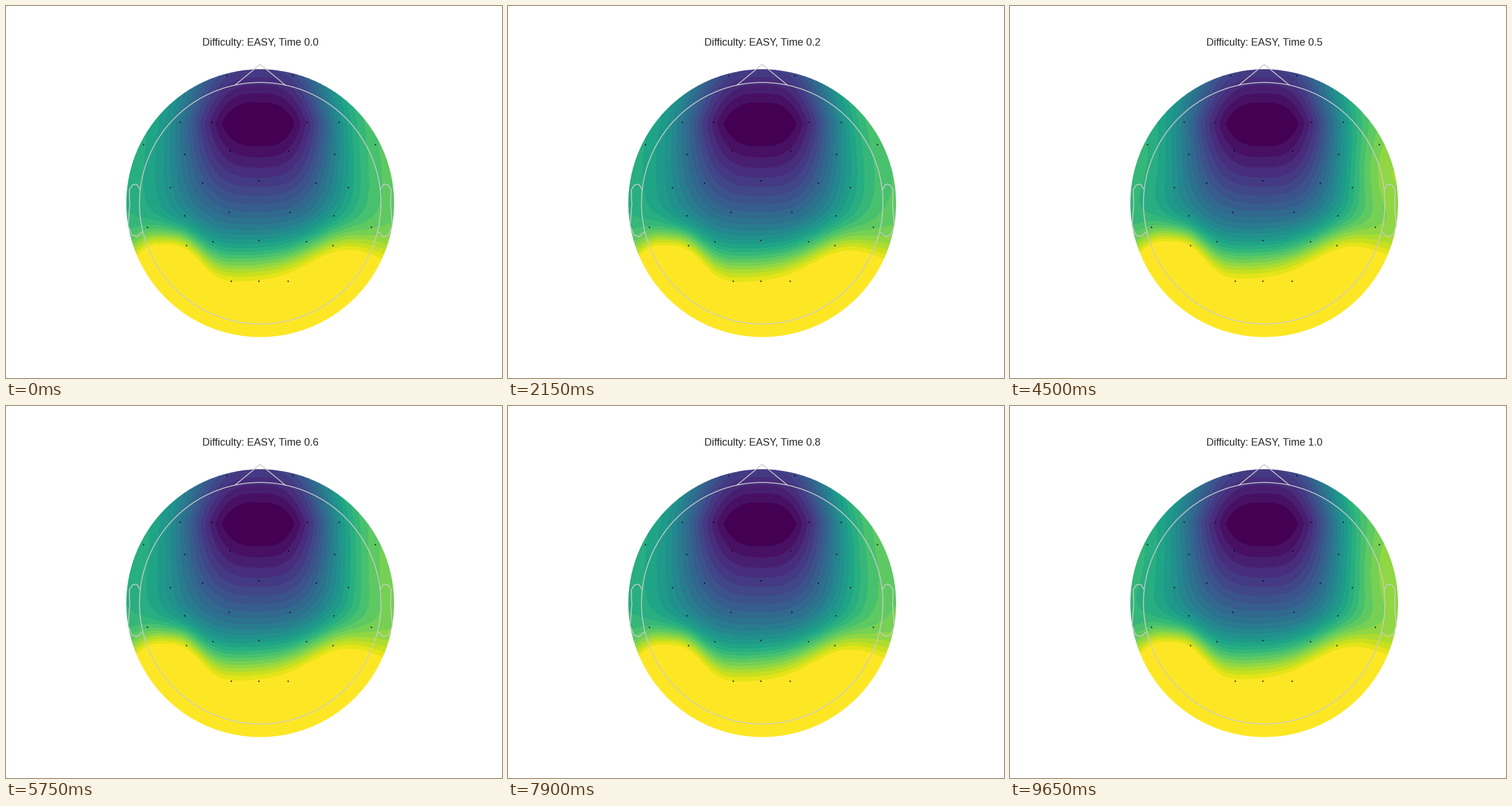
Recreate the animation shown at these times as a matplotlib script. Size 864 by 648 pixels, loop 10000 ms.

```python
import numpy as np
import matplotlib.pyplot as plt
from matplotlib.animation import FuncAnimation
from matplotlib.patches import Circle

W, H, DPI = 864, 648, 108
STEP, LOOP = 50, 10000
CX, CY, HEAD, RIM = 442.8, 343.5, 210.3, 233.2
MID, CORE_Y = 441, 205
BANDS = 25

# Sensors: offset from the midline and height, mirrored to both sides
PAIRS = [(57.5, 120.5), (138.5, 201.5), (83, 202), (202, 241), (130.5, 257.5),
         (51, 252), (155, 316), (99, 308), (130, 365), (53, 359), (195, 384.5),
         (81.5, 410), (127.5, 417), (49.5, 478.5)]
MIDLINE = [304, 408, 479]

# Bursts of change with short rests between: first ms, last ms, steps
RUNS = [(400, 1250, 11), (1450, 2400, 11), (2500, 3500, 11),
        (3650, 4650, 12), (4750, 5750, 9), (5800, 6700, 10),
        (6850, 7700, 10), (7900, 8850, 12), (8950, 9650, 9)]
CHANGES = np.concatenate(
    [np.round(np.linspace(a, b, n) / STEP) * STEP for a, b, n in RUNS])


def hill(x, center, width, power=2):
    return np.exp(-np.abs((x - center) / width) ** power)


def activity(x, y, p):
    """Level at (x, y) for progress p: dark in front, bright at the back."""
    wave = .03 - .09 * (1 - .5 * p) * np.cos(2 * np.pi * (p - .116) / .6)

    # Dark core that brightens along the midline and towards both sides
    d = y - CORE_Y
    floor = -.03 + np.where(d > 0, .001 * np.abs(d) ** 1.15,
                            .00062 * np.abs(d) ** 1.3)
    side = np.where(x < MID, .64, .75 + .03 * p)
    spread = 1 - hill(x, MID, 137 + .13 * d, 3)
    level = floor + (side - floor) * spread

    # Temporal drift, strongest on the right
    level += wave * hill(x, 660, 75) * hill(y, 295, 85)
    level += .4 * wave * hill(x, 230, 75) * hill(y, 265, 80)

    # Bright back with one lobe on each side
    left, right = hill(x, 280, 70, 3), hill(x, 588, 89)
    edge = 490 - 71 * left - 58 * right - 60 * wave
    soft = 28 - 13 * left - 8 * right
    rise = 1 / (1 + np.exp((edge - y) / soft - 1.1))
    return level + (1.12 - level) * rise


span = np.linspace(-RIM - 3, RIM + 3, 150)
GX, GY = np.meshgrid(CX + span, CY + span)

plt.rcParams["font.family"] = "Liberation Sans"
fig = plt.figure(figsize=(W / DPI, H / DPI), dpi=DPI, facecolor="white")
ax = fig.add_axes([0, 0, 1, 1])
ax.set(xlim=(0, W), ylim=(H, 0))
ax.axis("off")

disc = Circle((CX, CY), RIM, transform=ax.transData)
title = ax.text(CX, 68.8, "", ha="center", va="baseline", size=12, color=".15")


def outline(x, y):
    ax.plot(CX + HEAD * np.asarray(x), CY - HEAD * np.asarray(y),
            color=".8", lw=1, zorder=3)


turn = np.linspace(0, 2 * np.pi, 181)
outline(np.cos(turn), np.sin(turn))
outline([-.2094, 0, .2094], [.9778, 1.15, .9778])
ear_x = np.array([.994, 1.02, 1.036, 1.06, 1.084, 1.08, 1.094, 1.064, 1.02, .978])
ear_y = [.111, .155, .157, .149, .111, -.011, -.186, -.263, -.277, -.24]
for sign in (-1, 1):
    outline(sign * ear_x, ear_y)

dots = [(MID + s * dx, y) for dx, y in PAIRS for s in (-1, 1)]
dots += [(MID - 1, y) for y in MIDLINE]
ax.plot(*zip(*dots), "o", color="black", ms=1.5, mew=0, zorder=4)

LEVELS = np.linspace(0, 1, BANDS + 1)
COLORS = plt.get_cmap("viridis")(np.linspace(0, 1, BANDS))
shown = []


def draw(i):
    p = np.searchsorted(CHANGES, i * STEP, side="right") / len(CHANGES)
    while shown:
        shown.pop().remove()
    field = np.clip(activity(GX, GY, p), .001, .999)
    bands = ax.contourf(GX, GY, field, levels=LEVELS, colors=COLORS, zorder=1)
    bands.set_clip_path(disc)
    shown.append(bands)
    title.set_text(f"Difficulty: EASY, Time {p:.1f}")
    return [bands, title]


anim = FuncAnimation(fig, draw, frames=LOOP // STEP, interval=STEP,
                     repeat=True, repeat_delay=0)
plt.show()
```
